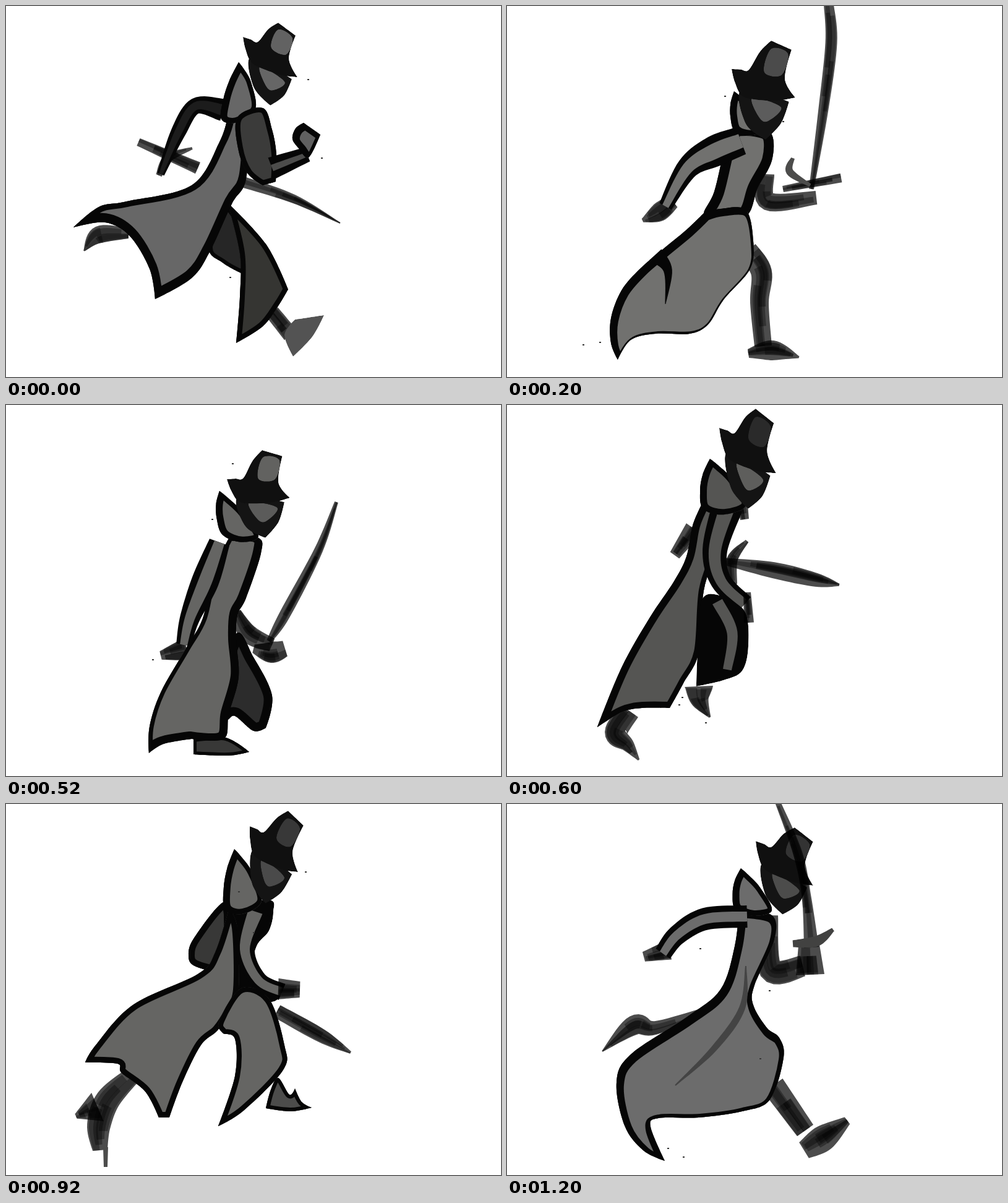
Write an HTML page with a canvas that moves like this. It is 800 px wide and 600 px high and loops after 1400 ms.

```html
<!DOCTYPE html>
<html lang="en">
<head>
<meta charset="utf-8">
<title>Running swordsman</title>
<style>
html, body { margin: 0; width: 100%; height: 100%; overflow: hidden; background: #fff; }
canvas { display: block; }
</style>
</head>
<body>
<canvas id="stage" width="800" height="600"></canvas>
<script>
const ctx = document.getElementById('stage').getContext('2d');
const HOLD = 200;
const INK = '#060606', DUSK = '#383837', MID = '#4c4c4b';

// Shared shapes, in units of the axes they are placed on.
const HAT = '0,0! .13,.08 .25,.15 .365,.65 .5,1! .82,1! .8,.3 1,0! .76,-.23 .45,-.42 .22,-.48 .08,-.25';
const CROWN = '.52,.82 .78,.88 .74,.35 .48,.25';
const HEAD = '.2,-.35 .92,-.15! .86,-.7 .68,-1.2! .35,-1.05';
const FACE = '.38,-.42 .82,-.35 .65,-.8 .5,-.75';
const COLLAR = '0,0 .5,-.15 1,0 .6,.54 .22,.85 0,1! -.12,.7 -.13,.36';

let seed = 1;
const rand = () => (seed = seed * 16807 % 2147483647) / 2147483647;

// Points are "x,y" or "x,y,width"; a trailing "!" makes a sharp corner.
const parse = s => s.split(' ').map(t => {
  const [x, y, w] = t.split(',').map(parseFloat);
  return { x, y, w, hard: t.endsWith('!') };
});

const place = (s, o, e, h) => parse(s).map(p => ({
  x: o.x + p.x * e.x + p.y * h.x,
  y: o.y + p.x * e.y + p.y * h.y,
  hard: p.hard
}));

const minus = (a, b) => ({ x: a.x - b.x, y: a.y - b.y });

function closed(p) {
  const path = new Path2D(), n = p.length, at = i => p[(i + n) % n];
  const slope = i => {
    const d = minus(at(i + 1), at(i - 1)), k = at(i).hard ? 0 : 1 / 6;
    return { x: d.x * k, y: d.y * k };
  };
  path.moveTo(p[0].x, p[0].y);
  p.forEach((a, i) => {
    const b = at(i + 1), u = slope(i), v = slope(i + 1);
    path.bezierCurveTo(a.x + u.x, a.y + u.y, b.x - v.x, b.y - v.y, b.x, b.y);
  });
  return path;
}

// Cloth with an inked rim; dx, dy shift the weight of the rim.
function panel(color, shape, rim = 0, dx = 0, dy = 0) {
  const path = closed(typeof shape === 'string' ? parse(shape) : shape);
  ctx.save();
  ctx.fillStyle = INK;
  if (rim) ctx.fill(path);
  ctx.clip(path);
  ctx.translate(dx, dy);
  ctx.fillStyle = color;
  ctx.fill(path);
  if (rim) {
    ctx.strokeStyle = INK;
    ctx.lineWidth = rim * 2;
    ctx.stroke(path);
  }
  ctx.restore();
}

// Samples a smooth spine with its normals.
function spine(s) {
  const p = parse(s), out = [], last = p.length - 1;
  const at = i => p[Math.max(0, Math.min(last, i))];
  for (let i = 0; i < last; i++) {
    for (let k = i ? 1 : 0; k <= 10; k++) {
      const t = k / 10;
      const mix = c => {
        const [a, b, d, e] = [at(i - 1)[c], at(i)[c], at(i + 1)[c], at(i + 2)[c]];
        return b + t * (d - a + t * (2 * a - 5 * b + 4 * d - e + t * (3 * (b - d) + e - a))) / 2;
      };
      out.push({ x: mix('x'), y: mix('y'), w: mix('w') });
    }
  }
  out.forEach((q, i) => {
    const d = minus(out[Math.min(i + 1, out.length - 1)], out[Math.max(0, i - 1)]);
    const len = Math.hypot(d.x, d.y) || 1;
    q.nx = -d.y / len;
    q.ny = d.x / len;
  });
  return out;
}

// Tapered stroke; scale thins it and shift moves it sideways, both in widths.
function ribbon(color, line, scale = 1, shift = 0) {
  const q = typeof line === 'string' ? spine(line) : line;
  const side = k => q.map(a => [a.x + a.nx * a.w * k, a.y + a.ny * a.w * k]);
  ctx.beginPath();
  [...side(shift + scale / 2), ...side(shift - scale / 2).reverse()]
    .forEach(([x, y]) => ctx.lineTo(x, y));
  ctx.fillStyle = color;
  ctx.fill();
}

// Translucent limb built from overlapping strokes.
function wash(s) {
  const q = spine(s), n = q.length;
  ribbon('rgba(0,0,0,.7)', q);
  for (let i = 0; i < 5; i++) {
    const from = Math.floor(rand() * n * 0.5);
    const to = from + 2 + Math.floor(n * (0.3 + rand() * 0.5));
    ribbon('rgba(0,0,0,.35)', q.slice(from, to), 0.4, rand() * 0.6 - 0.3);
  }
}

function sleeve(color, s, core = 0.5) {
  ribbon(INK, s);
  ribbon(color, s, core);
}

function collar(color, s) {
  const [tip, base, front] = parse(s);
  panel(color, place(COLLAR, base, minus(front, base), minus(tip, base)), 9, 2, 0);
}

// Head and hat hang on the two brim tips and the top of the crown.
function head(s, crown, face) {
  const [back, front, top] = parse(s);
  const mid = { x: (back.x + front.x) / 2, y: (back.y + front.y) / 2 };
  const put = (color, shape) => panel(color, place(shape, back, minus(front, back), minus(top, mid)));
  put('#141414', HEAD);
  put(face, FACE);
  put('#101010', HAT);
  put(crown, CROWN);
}

function specks(s) {
  ctx.fillStyle = DUSK;
  parse(s).forEach(p => ctx.fillRect(p.x - 1, p.y - 1, 3, 2));
}

function sprint() {
  const cloth = '#676767';
  wash('126,396,2 150,370,28 198,368,16');
  wash('214,220,13 310,262,20');
  wash('301,230,4 262,246,14 247,274,10');
  wash('378,283,18 465,312,14 540,351,2');
  wash('430,495,24 460,532,26');
  panel('#535353', '467,507! 514,500! 495,535 464,567! 450,532');
  sleeve('#1c1c1c', '350,168,36 306,162,26 278,205,24 250,272,12');
  panel('#262626', '355,318! 328,390 350,415 380,432! 400,390', 6);
  panel('#353532', '358,318! 420,385 456,458! 440,485 415,518 372,545! 378,470 378,400', 8);
  panel(cloth, '358,180! 345,220 300,290 195,316 150,325 109,358! 160,350 200,372 232,425 241,474! 300,440 330,396 365,320 388,280 395,180!', 12, 0, -3);
  collar(cloth, '376,91 348,183 403,167');
  panel('#3b3b3a', '374,180 375,230 390,270 415,290! 436,284! 437,240 430,200 415,165', 8);
  sleeve(MID, '430,262,36 487,240,24', 0.3);
  panel('#606060', '463,215 468,198 481,189! 508,208! 489,245 473,230', 9, 3, 2);
  head('383,50 471,115 440,27', '#626262', '#666');
  specks('488,119 510,246 362,439');
}

function raise() {
  const cloth = '#71716f';
  wash('520,-2,16 524,60,19 511,170,16 492,296,8');
  wash('446,296,10 540,278,15');
  ribbon(MID, '462,246,6 457,268,12 490,290,5');
  wash('388,395,34 411,430,34 408,480,30 414,550,28');
  wash('390,562,14 430,557,32 472,568,3');
  wash('418,272,28 422,316,30 500,310,22');
  wash('219,347,6 245,334,30 268,316,24');
  panel(cloth, '366,195! 400,195 428,208 428,250 405,295 386,340 330,345! 318,335 335,300 352,230', 16);
  sleeve(cloth, '378,218,46 335,235,50 292,262,36 256,324,22');
  panel(cloth, '318,335! 345,328 386,330 398,380 393,425 350,475 325,515 295,530 240,530 200,540 179,572! 168,545 168,505 185,460 215,425 250,395 290,362', 8, 4, 4);
  ribbon(INK, '240,402,26 260,428,14 256,482,1');
  collar(cloth, '367,138 368,202 418,198');
  head('363,102 466,148 427,56', '#4b4b4b', '#5c5c5c');
  specks('150,544 123,548 352,146 446,187');
}

function guard() {
  const cloth = '#656563';
  wash('534,157,6 505,235,14 450,340,18 425,382,8');
  wash('250,405,14 292,395,38');
  wash('372,335,16 392,370,30 430,388,22');
  wash('400,394,14 428,400,34 451,394,26');
  panel(DUSK, '303,540! 355,538 393,561! 360,567 303,565!', 5);
  panel('#2c2c2c', '372,370 400,408 430,470 420,522! 400,527 370,503 355,508 340,470', 14);
  panel(cloth, '362,212! 408,215 412,240 388,312 374,340 372,380 376,440 360,500 352,540 300,540! 255,548 231,563! 232,520 250,465 290,395 318,345 335,270', 10, -3, -2);
  sleeve(cloth, '345,222,34 322,285,44 297,345,32 287,388,24');
  collar(cloth, '345,139 350,210 408,212');
  head('357,120 459,150 414,73', '#626260', '#5b5b5a');
  specks('366,95 237,412 333,185');
}

function lunge() {
  const cloth = '#555553';
  wash('198,495,34 176,530,36 195,550,22 213,574,3');
  wash('310,455,46 312,478,30 328,505,3');
  wash('302,200,30 271,243,18');
  wash('388,220,6 364,250,18 365,290,14');
  wash('380,160,18 384,185,14');
  wash('345,252,10 430,267,26 500,283,22 537,291,4');
  panel(cloth, '315,160! 345,165 340,230 318,300 310,400 285,450 263,490! 218,490 185,497 146,521! 185,425 230,345 270,285 290,245 300,195', 10, 2, 0);
  panel(INK, '315,315 350,310 385,335 390,390 380,430 350,445 306,455! 308,400');
  ribbon(cloth, '340,318,18 364,368,17 356,428,14');
  sleeve(cloth, '356,165,50 336,235,40 346,285,34 384,322,30');
  wash('388,303,12 391,352,16');
  collar(cloth, '328,87 317,168 386,162');
  head('343,37 435,110 402,6', '#2a2a2a', '#5e5e5c');
  specks('278,485 283,473 321,514');
}

function stride() {
  const cloth = '#656563';
  wash('438,335,22 510,375,22 557,402,4');
  wash('205,438,28 165,478,40 150,520,38 152,560,24');
  wash('113,505,8 148,490,50');
  ribbon(MID, '161,555,8 161,587,6');
  panel(MID, '420,492! 428,462 440,443 458,470 467,460! 478,482 494,491! 460,497', 6);
  panel(DUSK, '355,158 305,215 295,245 305,262 345,268 362,230', 10);
  panel(INK, '352,165! 425,155 432,175 425,205 405,230 400,270 440,300 430,320 370,310 355,270');
  panel(cloth, '360,170! 374,200 376,300 362,335 342,366 315,390 285,450 264,507! 247,507! 225,465 187,435 180,420 128,418! 145,390 205,325 310,275 338,240', 9);
  panel(cloth, '380,298 425,315 450,390 448,430 385,495 343,521! 370,440 370,380 350,370 345,350', 8);
  sleeve(cloth, '403,174,48 386,235,32 408,285,28 446,304,28');
  wash('440,299,34 475,300,26');
  collar(cloth, '369,73 354,170 413,157');
  head('394,36 472,110 456,11', '#383838', '#4a4a4a');
  specks('376,142 400,208 484,110');
}

function leap() {
  const cloth = '#656563';
  wash('165,435,34 80,440,26 40,440,26 22,494,14');
  wash('365,318,10 460,310,20 567,288,2');
  wash('290,190,42 235,205,28 215,250,22 207,300,22');
  ribbon(cloth, '288,186,6 238,202,10 214,268,5');
  wash('395,430,28 410,475,26');
  wash('398,514,14 420,480,38 480,456,6');
  panel('#343433', '278,320 345,310 340,375 305,360', 4);
  panel(INK, '315,160! 370,158 373,205 366,255 412,268 412,312 360,320 300,300');
  panel(cloth, '290,165! 332,165 318,230 322,290 290,320 277,335 262,385 235,445 200,475 160,455 98,410 60,397 35,377! 75,383 110,370 190,312 235,295 270,255 287,215', 9);
  panel(cloth, '312,292! 345,300 395,345 412,375 420,412! 390,437 330,475 278,502! 320,455 335,415 335,360', 8, 3, 0);
  sleeve(cloth, '338,162,42 338,230,50 365,280,42 410,288,46', 0.62);
  wash('402,288,46 445,268,28');
  collar(cloth, '299,83 299,172 357,156');
  head('315,32 422,102 395,11', '#303030', '#2c2c2c');
  specks('334,25 398,180 389,209 428,66');
}

function swing() {
  const cloth = '#6c6c6c';
  wash('154,400,2 205,358,32 240,362,22 320,335,12');
  wash('430,455,38 482,528,32');
  wash('480,560,30 512,540,42 550,512,14');
  wash('221,247,16 262,236,32');
  wash('424,180,28 426,268,38 478,262,34');
  panel(cloth, '375,170! 428,180 432,220 400,293 398,325 420,362 440,378 447,410 425,478 380,497 310,507 245,508 232,522 255,577! 220,560 190,520 177,450 200,405 290,345 345,300 368,230', 10, 2, 4);
  ribbon('#444', '386,262,2 380,330,10 335,395,10 272,455,2');
  collar(cloth, '378,104 369,170 428,172');
  sleeve(cloth, '388,182,36 320,186,36 275,212,32 252,242,28', 0.45);
  head('402,60 495,132 465,38', '#333', MID);
  wash('488,228,34 490,276,46');
  wash('438,-2,9 470,80,15 484,150,15 492,232,24');
  ribbon('#424241', '462,226,11 500,222,17 527,203,6');
  specks('312,234 424,302 409,412 260,557 285,571');
}

const poses = [sprint, raise, guard, lunge, stride, leap, swing];
const start = performance.now();
let shown = -1;

function tick() {
  const i = Math.floor((performance.now() - start) / HOLD) % poses.length;
  if (i !== shown) {
    shown = i;
    seed = 41 + i;
    ctx.fillStyle = '#fff';
    ctx.fillRect(0, 0, 800, 600);
    poses[i]();
  }
  requestAnimationFrame(tick);
}
tick();
</script>
</body>
</html>
```
